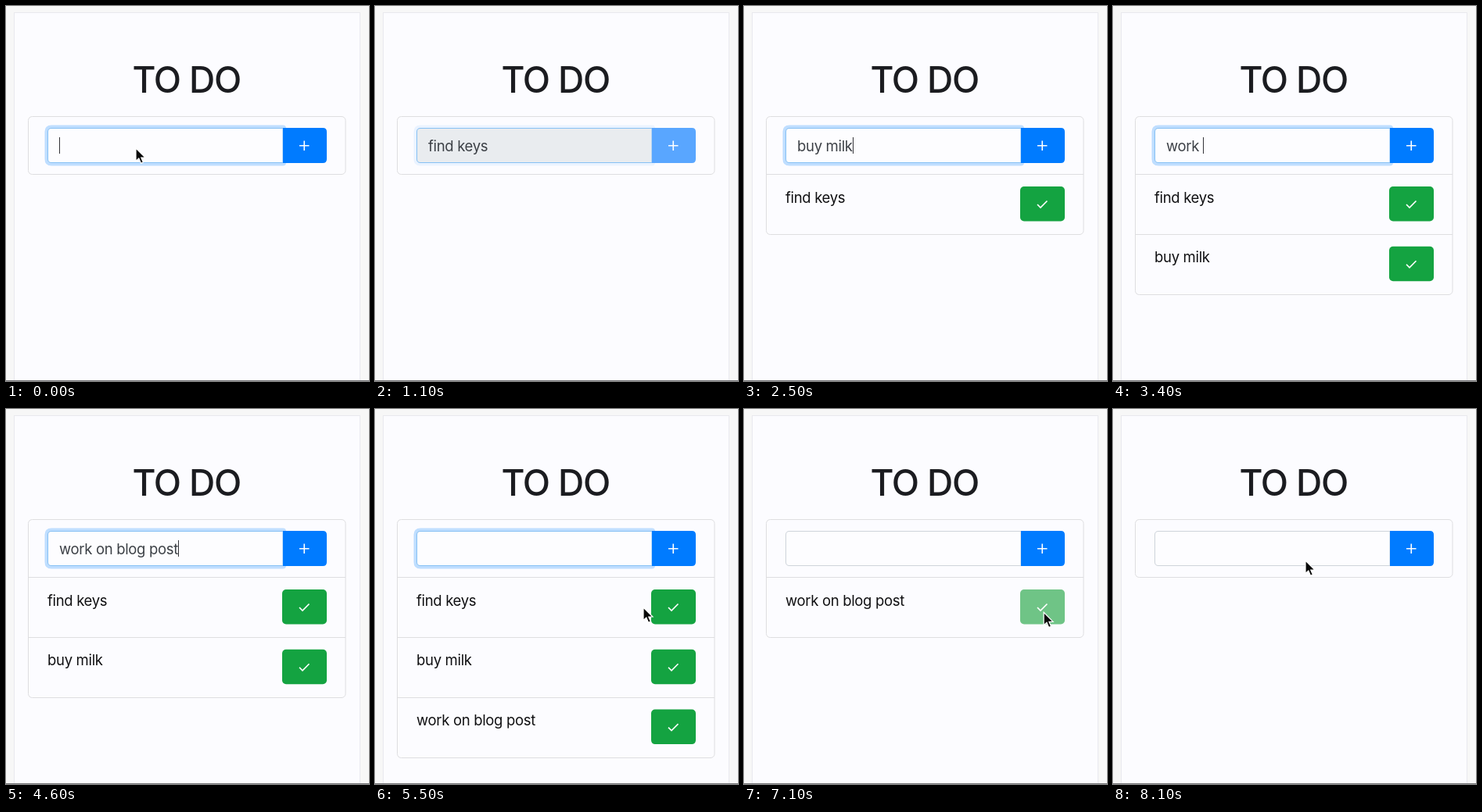
Recreate the animation shown at these times as an HTML page. Size 464 px wide and 480 px high, loop 8200 ms.

```html
<!DOCTYPE html>
<html lang="en">
<head>
<meta charset="utf-8">
<title>To do list</title>
<style>
  html, body { margin: 0; width: 100%; height: 100%; overflow: hidden; background: #f7f7f7; }
  svg { display: block; }
  text { font: 18.5px Inter, "Open Sans", sans-serif; letter-spacing: -.32px; white-space: pre; fill: #101012; }
  .title { font-size: 46px; font-weight: 500; letter-spacing: -1.2px; text-anchor: middle; fill: #1b1c20; }
  .typed { fill: #3c4046; }
  .line { fill: none; stroke: #dedee0; }
  .icon { fill: none; stroke: #fff; stroke-width: 1.6; }
</style>
</head>
<body>
<svg width="464" height="480" viewBox="0 0 464 480">
  <rect x="10.5" y="8.5" width="442" height="480" fill="#fcfcff" stroke="#e9e9ee"/>
  <text class="title" x="230.7" y="111">TO DO</text>
  <g id="list"></g>
  <g id="field"></g>
  <path id="caret" stroke="#333338"/>
  <path id="arrow" d="M0 0V16.5L3.8 13L6.5 19.3L9.4 18L6.8 12H12Z" fill="#080808" stroke="#fff" stroke-width="1.2"/>
  <rect y="479" width="464" height="1" fill="#77777a"/>
</svg>
<script>
const LOOP = 8200, STEP = 100, ROW = 76.8;
const $ = id => document.getElementById(id);

// Each task: typing starts, submitted, added, check clicked, removed
const tasks = [
  { name: 'find keys', type: 200, submit: 1100, add: 1300, click: 5700, gone: 6000 },
  { name: 'buy milk', type: 1700, submit: 2600, add: 2800, click: 6200, gone: 6500 },
  { name: 'work on blog post', type: 3000, submit: 4700, add: 4900, click: 6900, gone: 7200 }
];

// Pointer stops: time, x, y
const stops = [
  [0, 166, 182], [5000, 166, 182], [5200, 215, 205], [5500, 343, 254], [5700, 382, 262],
  [6200, 384, 264], [6300, 387, 283], [6500, 388, 288], [6800, 384, 262],
  [7200, 383, 260], [7800, 275, 204], [8100, 246, 194]
];

function pointer(t) {
  const i = Math.max(1, stops.findIndex(s => s[0] >= t));
  const [a, b] = [stops[i - 1], stops[i]];
  const p = (t - a[0]) / (b[0] - a[0]), e = p * p * (3 - 2 * p);
  return [1, 2].map(k => a[k] + (b[k] - a[k]) * e);
}

function row(task, i, t) {
  const y = 216 + i * ROW;
  const color = t >= task.click ? '#6fc486' : '#14a341';
  return `<path class="line" d="M28 ${Math.round(y) - .5}H434"/>
    <text x="53" y="${y + 35.5}">${task.name}</text>
    <rect x="353" y="${y + 15}" width="57" height="44.5" rx="5" fill="${color}"/>
    <path class="icon" d="M375 ${y + 38}l4 4l8.5 -8.5"/>`;
}

function field(text, busy, glow) {
  const box = 'M354 156.5H58Q53.5 156.5 53.5 161V196Q53.5 200.5 58 200.5H354Z';
  return `<path d="${box}" fill="none" stroke="#bfdeff" stroke-width="8" stroke-linejoin="round" opacity="${glow}"/>
    <path d="${box}" fill="${busy ? '#e9ecef' : '#fdfdff'}" stroke="${glow ? '#86c0f4' : '#ced4da'}"/>
    <path d="M354 156H405Q410 156 410 161V196Q410 201 405 201H354Z" fill="${busy ? '#59a6ff' : '#007bff'}"/>
    <path class="icon" d="M375 178.7H387.500M381.250 172.500V184.900"/>
    <text id="typed" class="typed" x="68" y="185.500">${text}</text>`;
}

function draw(t) {
  const shown = tasks.filter(k => t >= k.add && t < k.gone);
  const current = tasks.find(k => t >= k.type && t < k.add);
  const busy = !!current && t >= current.submit;
  const text = current ? current.name.slice(0, (t - current.type) / STEP + 1) : '';
  const focused = t < 5700;

  $('list').innerHTML = `<rect class="line" x="28.5" y="141.5" width="405.5"
    height="${Math.round(74.2 + shown.length * ROW)}" rx="5"/>` +
    shown.map((k, i) => row(k, i, t)).join('');
  $('field').innerHTML = field(text, busy, focused ? (busy ? .3 : 1) : 0);

  const x = Math.round(68 + (text ? $('typed').getComputedTextLength() : 0)) + .5;
  $('caret').setAttribute('d', focused && !busy && t < 5400 ? `M${x} 168V189` : '');

  $('arrow').setAttribute('transform', `translate(${pointer(t)})`);
  $('arrow').style.display = t >= 200 && t < 5000 ? 'none' : '';
}

let last = -1;
function tick() {
  const t = Math.floor(performance.now() % LOOP / STEP) * STEP;
  if (t !== last) draw(last = t);
  requestAnimationFrame(tick);
}
tick();
</script>
</body>
</html>
```
